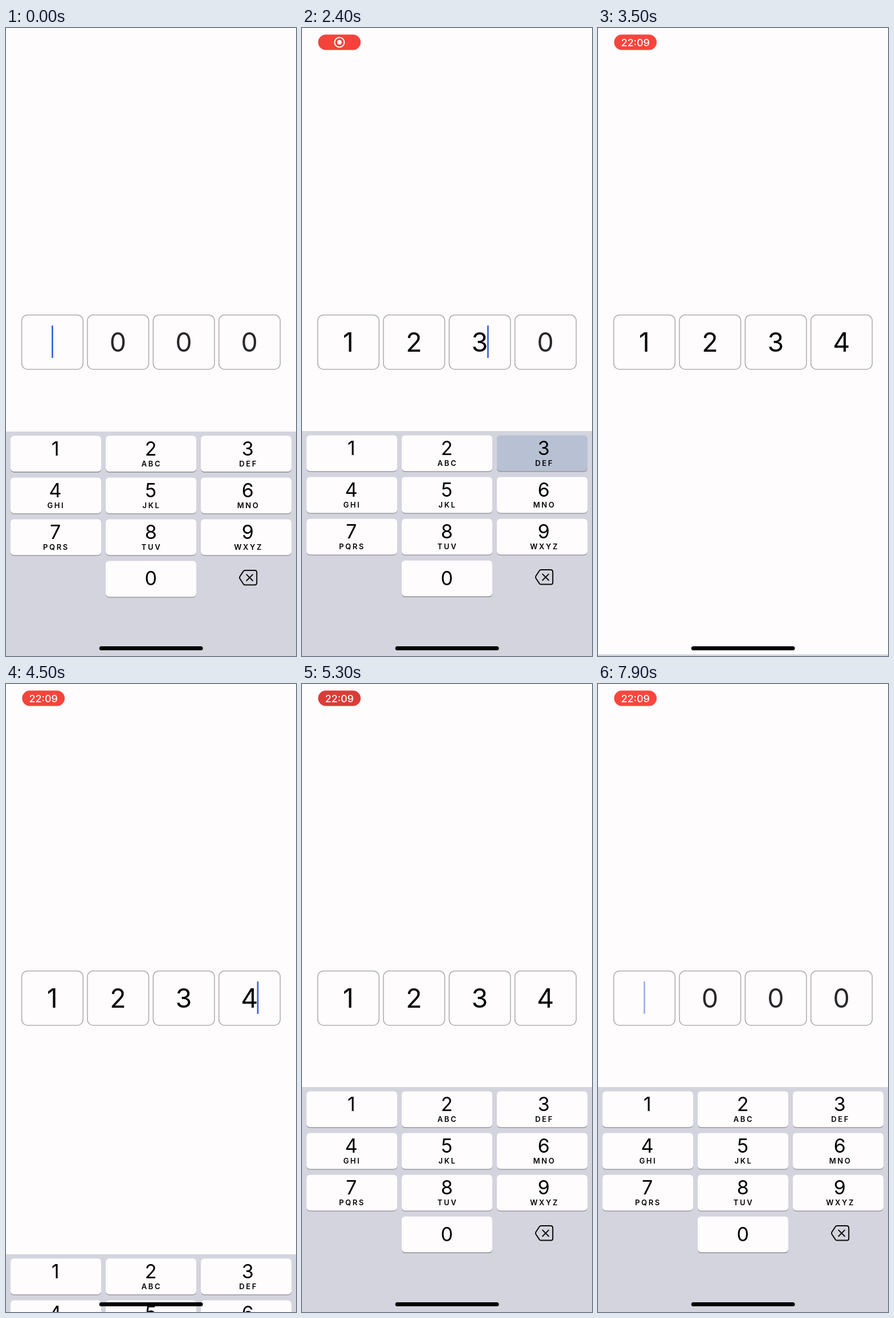
These frames come from a looping animation (509 by 1100 pixels, 8000 ms). An HTML page:

```html
<!DOCTYPE html>
<html lang="en">
<head>
<meta charset="utf-8">
<title>Code entry</title>
<style>
  html, body { margin: 0; height: 100%; overflow: hidden; background: #fefcfd; }
  svg { display: block; width: 100vw; height: 100vh; }
  text { font-family: Inter, Roboto, sans-serif; text-anchor: middle; }
  .box { fill: none; stroke: #a09fa2; stroke-width: 1.3; }
  .digit { font-size: 46.5px; }
  .key { fill: #fefcfd; }
  .key.down { fill: #b7c1d3; }
  .shade { fill: #8c8c92; }
  .num { font-size: 34px; }
  .abc { font-size: 13px; font-weight: 600; letter-spacing: 2.6px; }
  .clock { font-size: 17.9px; font-weight: 500; fill: #fff; }
</style>
</head>
<body>
<svg id="stage" viewBox="0 0 509 1100">
  <rect width="509" height="1100" fill="#fefcfd"/>
  <g id="pill">
    <rect id="pillBack" x="28.3" y="11.5" width="74.7" height="27" rx="13.5"/>
    <g id="record">
      <circle cx="65.7" cy="25" r="8.5" fill="none" stroke="#fff" stroke-width="2"/>
      <circle cx="65.7" cy="25" r="4" fill="#fff"/>
    </g>
    <text id="clock" class="clock" x="65.6" y="31.6">22:09</text>
  </g>
  <g id="fields"></g>
  <rect id="caret" y="521" width="2.8" height="57" rx="1" fill="#3f65dc"/>
  <g id="keyboard">
    <rect y="706" width="509" height="800" fill="#d3d4de"/>
    <g id="keys"></g>
    <g stroke="#0a0a0c" stroke-width="2" stroke-linejoin="round" stroke-linecap="round" transform="translate(0 -.4)">
      <path id="erase" d="M419.5 949.5H436.5Q440.2 949.5 440.2 953.2V971.3Q440.2 975 436.5 975H419.5Q418 975 416.9 973.8L410.6 964.4Q409.3 962.3 410.6 960.2L416.9 950.7Q418 949.5 419.5 949.5Z"/>
      <path id="cross" d="M422.3 957l10.6 10.6m0-10.6l-10.6 10.6"/>
    </g>
  </g>
  <rect x="163.7" y="1083" width="181.8" height="7" rx="3.5"/>
</svg>
<script>
const LOOP = 8000, STEP = 100, HOLD = 100;
const TYPED = [1600, 2000, 2400, 2800];
const ERASED = [5900, 6200, 6600, 7000];
const BLUR = 3000, HIDE = 3033.5, SHOW = 4434.7, FOCUS = 4500;
const KEYBOARD_HEIGHT = 394;
const CARET_OFFSET = [10, 14, 14.3, 14.5];

const $ = id => document.getElementById(id);
const clamp = v => Math.max(0, Math.min(1, v));
const ramp = (t, from, to) => clamp((t - from) / (to - from));

function add(parent, tag, attrs, content = '') {
  const el = document.createElementNS('http://www.w3.org/2000/svg', tag);
  for (const name in attrs) el.setAttribute(name, attrs[name]);
  el.textContent = content;
  return parent.appendChild(el);
}

const centre = i => 81.4 + 115.35 * i;
const digits = [0, 1, 2, 3].map(i => {
  add($('fields'), 'rect', { class: 'box', x: centre(i) - 53.8, y: 502.6, width: 107.6, height: 95.2, rx: 10 });
  return add($('fields'), 'text', { class: 'digit', x: centre(i) - 0.3, y: 567.3 });
});

const letters = ['', 'ABC', 'DEF', 'GHI', 'JKL', 'MNO', 'PQRS', 'TUV', 'WXYZ', '', ''];
const textX = [86.6, 254.2, 424.3];
const keys = letters.map((abc, i) => {
  if (i === 9) return null;
  const col = i % 3, x = 8 + 167 * col, y = 713.5 + 73.1 * Math.floor(i / 3);
  const zero = i === 10;
  const shape = { x, width: 159, height: 62.8, rx: 6 };
  add($('keys'), 'rect', { ...shape, class: 'shade', y: y + 1.3 });
  const key = add($('keys'), 'rect', { ...shape, class: 'key', y });
  add($('keys'), 'text', { class: 'num', x: textX[col], y: y + (zero ? 42.7 : 34.5) }, zero ? 0 : i + 1);
  add($('keys'), 'text', { class: 'abc', x: textX[col] + 1.3, y: y + 53.4 }, abc);
  return key;
});

// Critically damped spring from 0 to 1
function spring(ms) {
  const x = Math.max(0, ms) * 0.015;
  return 1 - (1 + x) * Math.exp(-x);
}

function blink(ms) {
  const p = ms % 1000 / 1000;
  return p < 0.5 ? 1 : p < 0.8 ? 1 - ramp(p, 0.5, 0.65) : ramp(p, 0.8, 1);
}

function drawPill(t) {
  const glow = 0.5 - 0.5 * Math.cos((t - 1000) / 1050 * 2 * Math.PI);
  const mix = (dim, bright) => Math.round(dim + (bright - dim) * glow);
  $('pillBack').setAttribute('fill', `rgb(${mix(217, 255)},${mix(59, 69)},${mix(54, 61)})`);
  $('pill').setAttribute('opacity', ramp(t, 100, 400));
  $('record').setAttribute('opacity', 1 - ramp(t, 3100, 3400));
  $('clock').setAttribute('opacity', ramp(t, 3070, 3450));
}

function drawKeyboard(t) {
  const settle = 0.8 * (1 - ramp(t, 0, 300));
  const y = settle + KEYBOARD_HEIGHT * (spring(t - HIDE) - spring(t - SHOW));
  $('keyboard').setAttribute('transform', `translate(0 ${y.toFixed(2)})`);
}

function drawFields(t) {
  const passed = times => times.filter(s => t >= s).length;
  const held = s => t >= s && t < s + HOLD;
  const erased = passed(ERASED);
  const count = passed(TYPED) - erased;
  const pressed = TYPED.findIndex(held);
  const erasing = ERASED.some(held);
  const focused = t < BLUR || t >= FOCUS;
  // Focus moves on when a key is released, and back when a digit is erased
  const current = pressed >= 0 ? pressed
    : erased ? Math.max(0, count - 1) : Math.min(3, count);

  digits.forEach((el, i) => {
    const filled = i < count;
    el.textContent = filled ? i + 1 : focused && i === current ? '' : '0';
    el.setAttribute('fill', filled ? '#060608' : '#29282b');
  });

  const x = centre(current) + (current < count ? CARET_OFFSET[current] : 0);
  const lastInput = Math.max(0, ...[...TYPED, FOCUS, ...ERASED].filter(s => s <= t));
  $('caret').setAttribute('x', x - 1.4);
  $('caret').setAttribute('opacity', focused ? blink(t - lastInput) : 0);

  keys.forEach((key, i) => key && key.classList.toggle('down', i === pressed));
  $('erase').setAttribute('fill', erasing ? '#0a0a0c' : 'none');
  $('cross').setAttribute('stroke', erasing ? '#d3d4de' : '#0a0a0c');
}

const start = performance.now();
function tick() {
  const elapsed = performance.now() - start;
  const t = Math.floor(elapsed % LOOP / STEP) * STEP;
  drawPill(t);
  drawKeyboard(t);
  drawFields(t);
  requestAnimationFrame(tick);
}
tick();
</script>
</body>
</html>
```
